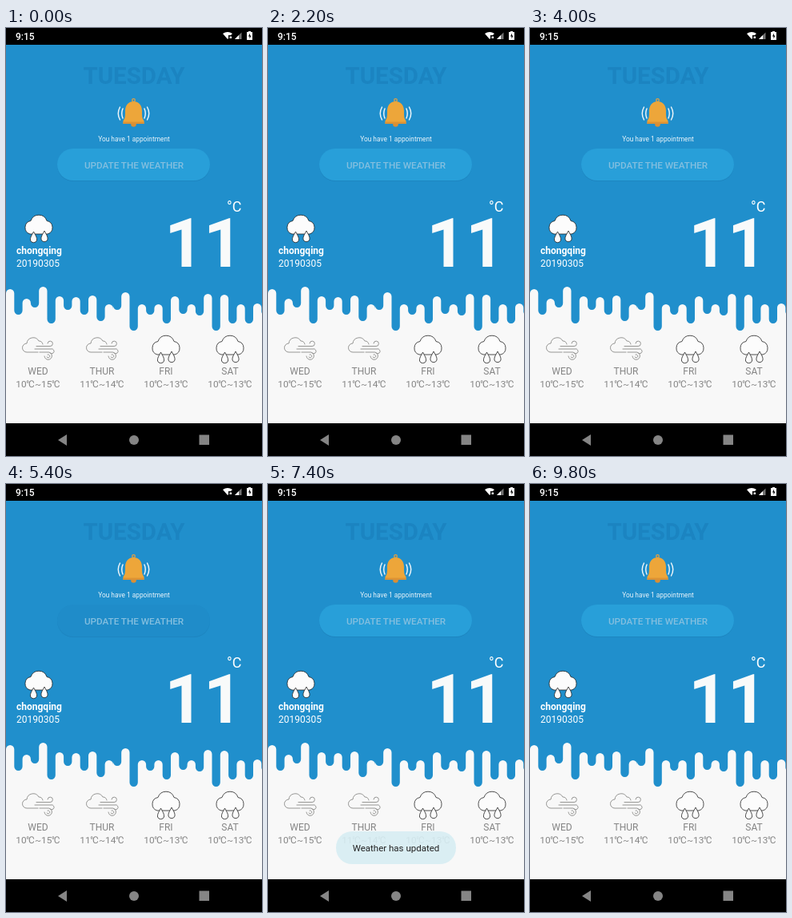
Recreate the animation shown at these times as an HTML page. Size 320x536 px, loop 10 s.

```html
<!DOCTYPE html>
<html lang="en">
<head>
<meta charset="utf-8">
<title>Weather</title>
<style>
  html, body { margin: 0; width: 100%; height: 100%; overflow: hidden; background: #f8f8f8; }
  svg { display: block; width: 320px; height: 536px; font: 12px Roboto, sans-serif; }
  .mid { text-anchor: middle; }
  .line { fill: none; stroke-linecap: round; }
</style>
</head>
<body>
<svg viewBox="0 0 320 536">
  <defs>
    <g id="rain" fill="#fcfcfc" stroke="#222" stroke-width=".8" stroke-linejoin="round">
      <path d="M-11 8A8.5 8.5 0 0 1-10-8.500A10.5 10.5 0 0 1 10-8.500A8.5 8.5 0 0 1 11 8Z"/>
      <path id="drop" d="M-6.500 5C-4 10-2 12-2.500 16A4.300 4.300 0 0 1-10.500 16C-11 12-9 10-6.500 5Z"/>
      <use href="#drop" x="13.500" y="-1"/>
    </g>
    <g id="wind" class="line" stroke="#8b8b88" stroke-width=".9">
      <path d="M0 5H-14A5.500 5.500 0 0 1-14-6A8 8 0 0 1 1-9A5 5 0 0 1 6-5"/>
      <path d="M-2-2.500H15A3.200 3.200 0 1 0 12-6M-4 1H16A3 3 0 1 1 15 6M2 5H12A4.700 4.700 0 1 1 8 10M12 8A2 2 0 1 1 11 11"/>
    </g>
  </defs>

  <rect width="320" height="536" fill="#f8f8f8"/>
  <path id="sky" fill="#208fcc"/>

  <g id="status">
    <rect width="320" height="21"/>
    <g fill="#fff">
      <text x="12" y="15" font-weight="500">9:15</text>
      <path d="M271 7Q277 3 283 7L281 9H278V13L277 14Z"/>
      <path d="M279.500 10.500H282V13H279.500Z"/>
      <path d="M286 14L294.500 5.500V14Z" opacity=".45"/>
      <path d="M286 14L291 9V14Z"/>
      <path d="M303 4H306V5H308V15H301V5H303Z"/>
    </g>
    <path d="M305 6.500L303 10.500H304.500V13.500L306.500 9.500H305Z"/>
  </g>

  <text class="mid" x="160" y="70" font-size="29.500" font-weight="700" fill="#1b84c1">TUESDAY</text>

  <g id="bell">
    <circle class="line" cx="159.500" cy="90.500" r="1.800" stroke="#e5a040" stroke-width="1.300"/>
    <circle cx="159.500" cy="120.500" r="3.300" fill="#d98f35"/>
    <path d="M159.500 92C167 92 170 98 170 104C170 111 170 113 172.500 116V120H146.500V116C149 113 149 111 149 104C149 98 152 92 159.500 92Z" fill="#eda63a"/>
    <path d="M146.500 117.500H172.500V120H146.500Z" fill="#dc9235"/>
    <path class="line" d="M146 101Q143.500 107 146 113M142.500 99Q138 107 142.500 115M173 101Q175.500 107 173 113M176.500 99Q181 107 176.500 115" stroke="#f4f8fa" stroke-width="1.400"/>
  </g>
  <text class="mid" x="160" y="142" font-size="8.350" fill="#e9f4fa">You have 1 appointment</text>

  <rect x="64" y="152" width="191" height="40" rx="20" fill="#1d85c0"/>
  <rect id="button" x="64" y="151" width="191" height="40" rx="20"/>
  <text class="mid" x="160" y="176" font-size="11.700" font-weight="500" fill="#84bfdf">UPDATE THE WEATHER</text>

  <use href="#rain" x="41" y="250"/>
  <g fill="#fff">
    <text x="13" y="283" font-weight="700">chongqing</text>
    <text x="13" y="299">20190305</text>
    <text class="mid" x="247" y="298.500" font-size="85" font-weight="700" fill="#f8fafa">11</text>
    <text x="294.500" y="229.500" font-size="18" text-anchor="end">°C</text>
  </g>

  <g id="forecast" class="mid" fill="#858585"></g>

  <g id="toast">
    <rect x="85" y="435" width="150" height="41" rx="20" fill="#d7eef3" opacity=".9"/>
    <text class="mid" x="160" y="460" font-size="11.500" fill="#222">Weather has updated</text>
  </g>

  <rect y="495" width="320" height="41"/>
  <path d="M65 516L76 509V523ZM241.500 509.500H254V522H241.500Z" fill="#858585"/>
  <circle cx="160" cy="516" r="6" fill="#858585"/>
</svg>
<script>
const LOOP = 10000, STEP = 200;
const $ = id => document.getElementById(id);
const clamp = v => Math.max(0, Math.min(1, v));

// Alternating crest and drip heights, left to right
const edge = [327, 359, 339, 350, 324, 370, 336, 353, 337, 359, 335, 367, 346, 353, 331, 379,
  346, 359, 346, 370, 336, 358, 346, 360, 333, 379, 334, 370, 346, 370, 345, 360];

function skyPath() {
  const width = 10.3, r = width / 2;
  let d = 'M0 20V340';
  edge.forEach((y, i) => {
    const crest = i % 2 === 0, side = crest ? y + r : y - r;
    d += `V${side}A${r} ${r} 0 0 ${crest ? 1 : 0} ${(i + 1) * width} ${side}`;
  });
  return d + 'V20Z';
}
$('sky').setAttribute('d', skyPath());

$('forecast').innerHTML = [
  ['WED', '10℃~15℃', 'wind'],
  ['THUR', '11℃~14℃', 'wind'],
  ['FRI', '10℃~13℃', 'rain'],
  ['SAT', '10℃~13℃', 'rain']
].map(([day, range, icon], i) => {
  const x = 40 + i * 80;
  return `<use href="#${icon}" x="${x}" y="401"/>
    <text x="${x}" y="434">${day}</text>
    <text x="${x}" y="450" font-size="11.800">${range}</text>`;
}).join('');

function draw(now) {
  const t = Math.floor(now % LOOP / STEP) * STEP;
  const pressed = t >= 5200 && t < 5800;
  $('button').setAttribute('fill', pressed ? '#1f8cc9' : '#289fd9');
  $('toast').setAttribute('opacity', Math.min(clamp((t - 7000) / 400), clamp((9000 - t) / 400)));
  requestAnimationFrame(draw);
}
draw(performance.now());
</script>
</body>
</html>
```
